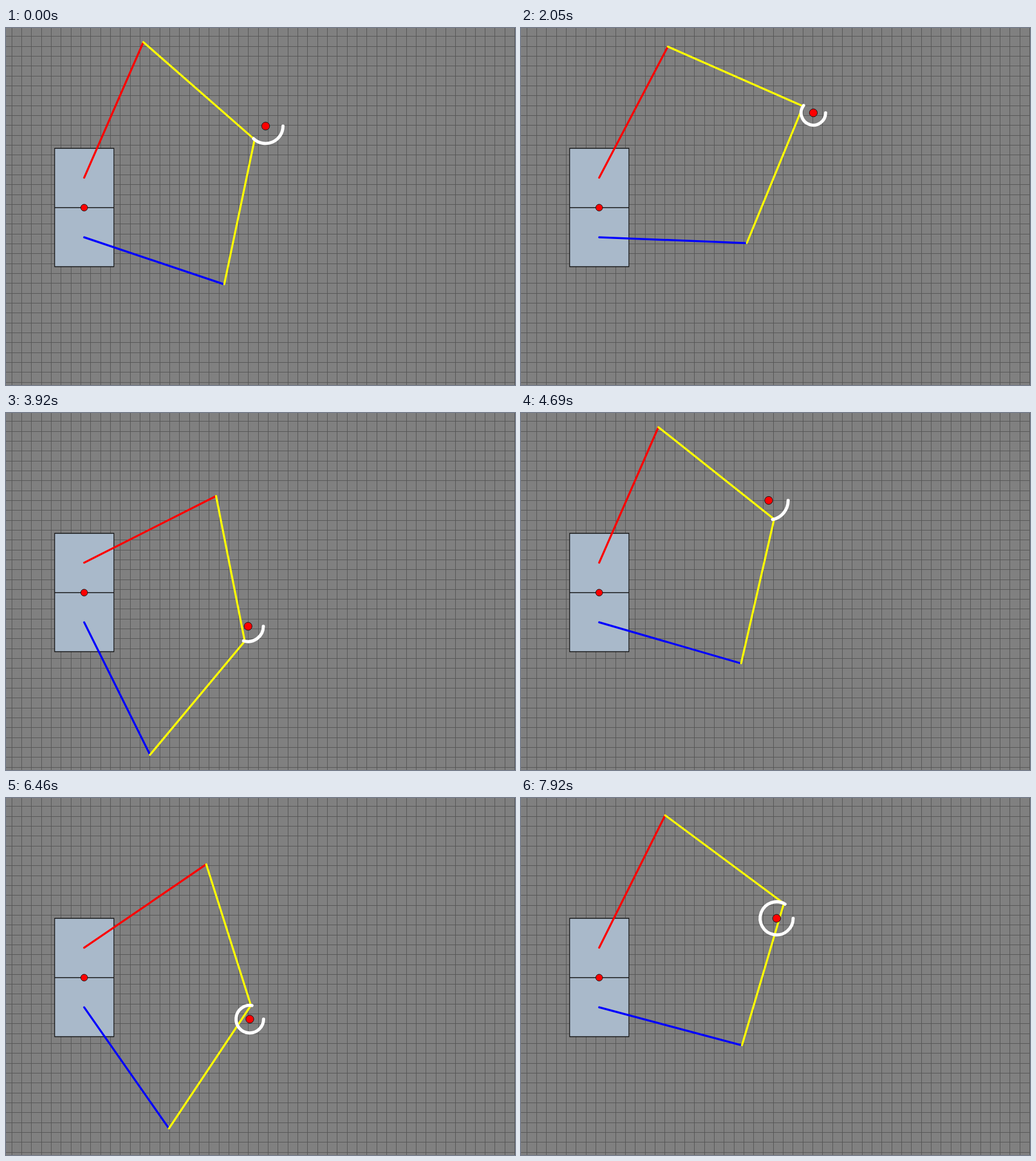
An HTML page that plays this animation: 894x626 px, repeating every 7990 ms.

```html
<!DOCTYPE html>
<html lang="en">
<head>
<meta charset="utf-8">
<title>Five-bar arm</title>
<style>
  html, body { margin: 0; width: 100%; height: 100%; overflow: hidden; background: #808080; }
  svg { display: block; width: 894px; height: 626px; }
  .limb { fill: none; stroke-width: 3.5; stroke-linecap: round; stroke-linejoin: round; }
</style>
</head>
<body>
<svg viewBox="0 0 894 626">
  <rect width="894" height="626" fill="#808080"/>
  <path id="grid" stroke="#555" fill="none"/>
  <path d="M85.5 211H189.5V418.5H85.5ZM85.5 315H189.5" fill="#a9b9ca" stroke="#111" stroke-width="1.3"/>
  <circle cx="137.3" cy="315" r="6" fill="#f00" stroke="#111"/>
  <path id="upper" class="limb" stroke="#f00"/>
  <path id="lower" class="limb" stroke="#00f"/>
  <path id="fore" class="limb" stroke="#ff0"/>
  <path id="trace" fill="none" stroke="#fff" stroke-width="5.5" stroke-linecap="round"/>
  <circle id="dot" r="7" fill="#f00" stroke="#111"/>
</svg>
<script>
const LOOP = 7990, STEPS = 116, UNIT = 17.32, LIMB = 259.5;
const TOP = [137.3, 262.5], BOTTOM = [137.3, 367];
const FIRST = -2.88;              // step at which the first circle began
const PEN = 3.81 * 2 * Math.PI;   // drawing speed, px per step
const LEAD = 0.08;                // the trace runs slightly ahead of the hand
const el = id => document.getElementById(id);

const onCircle = (c, a) => [c.x + c.r * Math.cos(a), c.y + c.r * Math.sin(a)];
const path = (...pts) => "M" + pts.map(p => p.map(v => v.toFixed(2)).join(" ")).join("L");

// Circles to draw: centre x, centre y, radius
const circles = [
  [456, 172, 30.5], [469.5, 177, 29], [474.3, 205, 31.4], [513.5, 148.8, 21.5],
  [497.6, 365, 26.4], [453.5, 340.5, 29], [425.2, 374, 26.8], [435, 153.3, 34.2],
  [402.2, 440, 26.3], [428.2, 387.8, 24.2], [432.7, 261, 31], [449, 211, 29]
].map(([x, y, r]) => ({ x, y, r }));

// Constant pen speed on a circle, then a short move to the next one
circles.forEach((c, i) => {
  const prev = circles[i - 1];
  c.from = onCircle(prev || c, 0);
  c.to = onCircle(c, 0);
  const gap = Math.hypot(c.to[0] - c.from[0], c.to[1] - c.from[1]);
  c.start = prev ? prev.end + 1.475 + 0.012 * gap : FIRST;
  c.end = c.start + 2 * Math.PI * c.r / PEN;
});

// Elbow of two equal limbs; side is -1 above the reach line, 1 below it
function elbow([sx, sy], [tx, ty], side) {
  const dx = tx - sx, dy = ty - sy, d = Math.hypot(dx, dy);
  const h = side * Math.sqrt(Math.max(0, LIMB * LIMB - d * d / 4)) / d;
  return [(sx + tx) / 2 - dy * h, (sy + ty) / 2 + dx * h];
}

function arc(c, a) {
  const [x, y] = onCircle(c, a);
  return `M${c.x + c.r} ${c.y}A${c.r} ${c.r} 0 ${a > Math.PI ? 1 : 0} 1 ${x.toFixed(2)} ${y.toFixed(2)}`;
}

function pose(step) {
  const i = circles.findIndex(c => step < c.end), c = circles[i];
  if (step >= c.start) {
    const a = PEN * (step - c.start) / c.r;
    return { c, hand: onCircle(c, a), trace: arc(c, Math.min(a + LEAD, 6.28)) };
  }
  const left = circles[i - 1].end, k = (step - left) / (c.start - left);
  return { c, hand: c.from.map((v, n) => v + (c.to[n] - v) * k), trace: "" };
}

function draw(ms) {
  const step = Math.min(STEPS - 1, Math.floor(ms / LOOP * STEPS + 0.27));
  const { c, hand, trace } = pose(step);
  const a = elbow(TOP, hand, -1), b = elbow(BOTTOM, hand, 1);
  el("upper").setAttribute("d", path(TOP, a));
  el("lower").setAttribute("d", path(BOTTOM, b));
  el("fore").setAttribute("d", path(a, hand, b));
  el("trace").setAttribute("d", trace);
  el("dot").setAttribute("cx", c.x);
  el("dot").setAttribute("cy", c.y);
}

const snap = v => Math.floor(v) + 0.5;
let grid = "";
for (let x = 10.3; x < 894; x += UNIT) grid += `M${snap(x)} 0V626`;
for (let y = 14.9; y < 626; y += UNIT) grid += `M0 ${snap(y)}H894`;
el("grid").setAttribute("d", grid);

const t0 = performance.now();
function tick() {
  draw((performance.now() - t0) % LOOP);
  requestAnimationFrame(tick);
}
draw(0);
requestAnimationFrame(tick);
</script>
</body>
</html>
```
